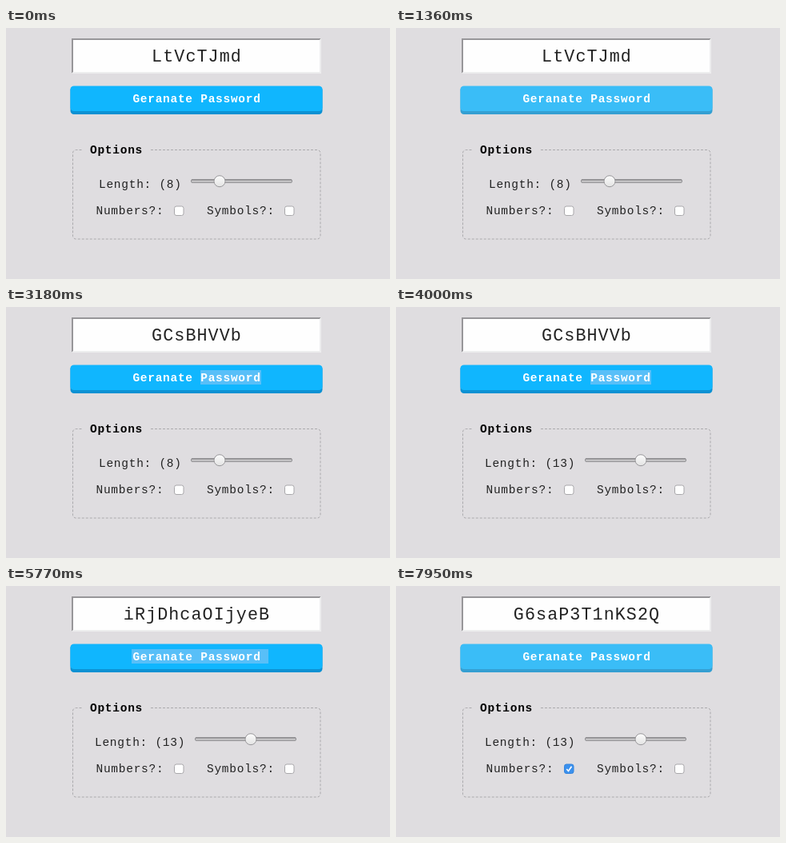
An HTML page for the animation above (8000 ms loop, 480 by 314 pixels).

```html
<!DOCTYPE html>
<html lang="en">
<head>
<meta charset="utf-8">
<title>Password generator</title>
<style>
html, body { margin: 0; width: 100%; height: 100%; overflow: hidden; background: #dfdde0; }
svg { display: block; width: 100vw; height: 100vh; }
text { font-family: "Courier New", "Liberation Mono", monospace; font-size: 14.5px; letter-spacing: .05em; fill: #222; white-space: pre; }
.mid { text-anchor: middle; }
.bold { font-weight: bold; }
#password { font-size: 21.7px; }
</style>
</head>
<body>
<svg viewBox="0 0 480 314">
  <defs>
    <linearGradient id="knob" x2="0" y2="1">
      <stop stop-color="#fdfdfd"/><stop offset="1" stop-color="#e3e3e3"/>
    </linearGradient>
  </defs>
  <rect width="480" height="314" fill="#dfdde0"/>

  <rect x="82" y="13" width="312" height="44" fill="#fefefe"/>
  <path d="M82 57V13H394L392 15H84V55Z" fill="#979699"/>
  <path d="M82 57H394V13L392 15V55H84Z" fill="#ededee"/>
  <text id="password" class="mid" x="238.500" y="42"></text>

  <rect id="edge" x="80.500" y="73" width="315" height="35" rx="4.500"/>
  <rect id="face" x="80.500" y="72.500" width="315" height="31.500" rx="4.500"/>
  <rect id="selection" y="79" height="18"/>
  <text class="mid bold" x="238.500" y="92.500" style="fill:#fff">Geranate Password</text>

  <path d="M181 152.500H389a4 4 0 0 1 4 4V260a4 4 0 0 1-4 4H87.500a4 4 0 0 1-4-4V156.500a4 4 0 0 1 4-4H95"
    fill="none" stroke="#aaa9ac" stroke-dasharray="3 2"/>
  <text class="bold" x="105" y="156.500" style="fill:#000">Options</text>

  <text id="length" y="199.500"></text>
  <g id="slider">
    <rect x=".5" y="189.500" width="126" height="4" rx="1.500" fill="#c3c2c4" stroke="#949396"/>
    <path d="M1 190H126" stroke="#858487"/>
    <circle id="thumb" cy="191.700" r="7" fill="url(#knob)" stroke="#98979a"/>
  </g>

  <text x="112.500" y="233">Numbers?:</text>
  <rect id="box" x="210.500" y="223" width="11.500" height="11.500" rx="2.500"/>
  <path id="tick" d="M213.300 229l2.200 2.500 4-5.700" fill="none" stroke="#fff" stroke-width="1.700"/>
  <text x="251" y="233">Symbols?:</text>
  <rect x="348.500" y="223" width="11.500" height="11.500" rx="2.500" fill="#fefefe" stroke="#a9a8ab"/>
</svg>
<script>
const LOOP = 8000;
const $ = id => document.getElementById(id);

// Each track lists [start ms, value]; values hold until the next entry.
const tracks = {
  password: [
    [0, "LtVcTJmd"], [1720, "qWzRaPkN"], [1960, "GCsBHVVb"],
    [4700, "TnXvQeLwuKbZo"], [5080, "mYcGdSfHrJpAx"], [5280, "iRjDhcaOIjyeB"],
    [6960, "dL17bjC54r0os"], [7560, "G6saP3T1nKS2Q"]
  ],
  hover: [[0, false], [640, true], [2750, false], [4400, true], [5620, false], [6800, true]],
  selected: [[0, ""], [1960, "word"], [4700, ""], [5080, "word"], [5280, "line"], [6040, ""]],
  length: [[0, 8], [3420, 9], [3520, 10], [3620, 11], [3720, 12], [3840, 13]],
  numbers: [[0, false], [6280, true]]
};
const marks = { "": [0, 0], word: [243, 76], line: [157, 171] };

const at = (track, t) => track.reduce((value, [start, next]) => t >= start ? next : value, track[0][1]);

function set(id, attrs) {
  for (const key in attrs) $(id).setAttribute(key, attrs[key]);
}

function draw(t) {
  const state = {};
  for (const key in tracks) state[key] = at(tracks[key], t);
  const { password, hover, selected, length, numbers } = state;
  const shift = length > 9 ? 5 : 0;
  const [x, width] = marks[selected];

  $("password").textContent = password;
  set("face", { fill: hover ? "#3abdf7" : "#10b6fe" });
  set("edge", { fill: hover ? "#349fd2" : "#0c91d3" });
  set("selection", { x, width, fill: hover ? "#70c4f6" : "#58bff8" });

  $("length").textContent = `Length: (${length})`;
  set("length", { x: 116 - shift });
  set("slider", { transform: `translate(${231 + shift})` });
  set("thumb", { cx: 36 + (length - 8) * 6.8 });

  set("box", { fill: numbers ? "#3b91ee" : "#fefefe", stroke: numbers ? "#3484dc" : "#a9a8ab" });
  set("tick", { visibility: numbers ? "visible" : "hidden" });
}

function tick(now) {
  draw(now % LOOP);
  requestAnimationFrame(tick);
}
draw(0);
requestAnimationFrame(tick);
</script>
</body>
</html>
```
